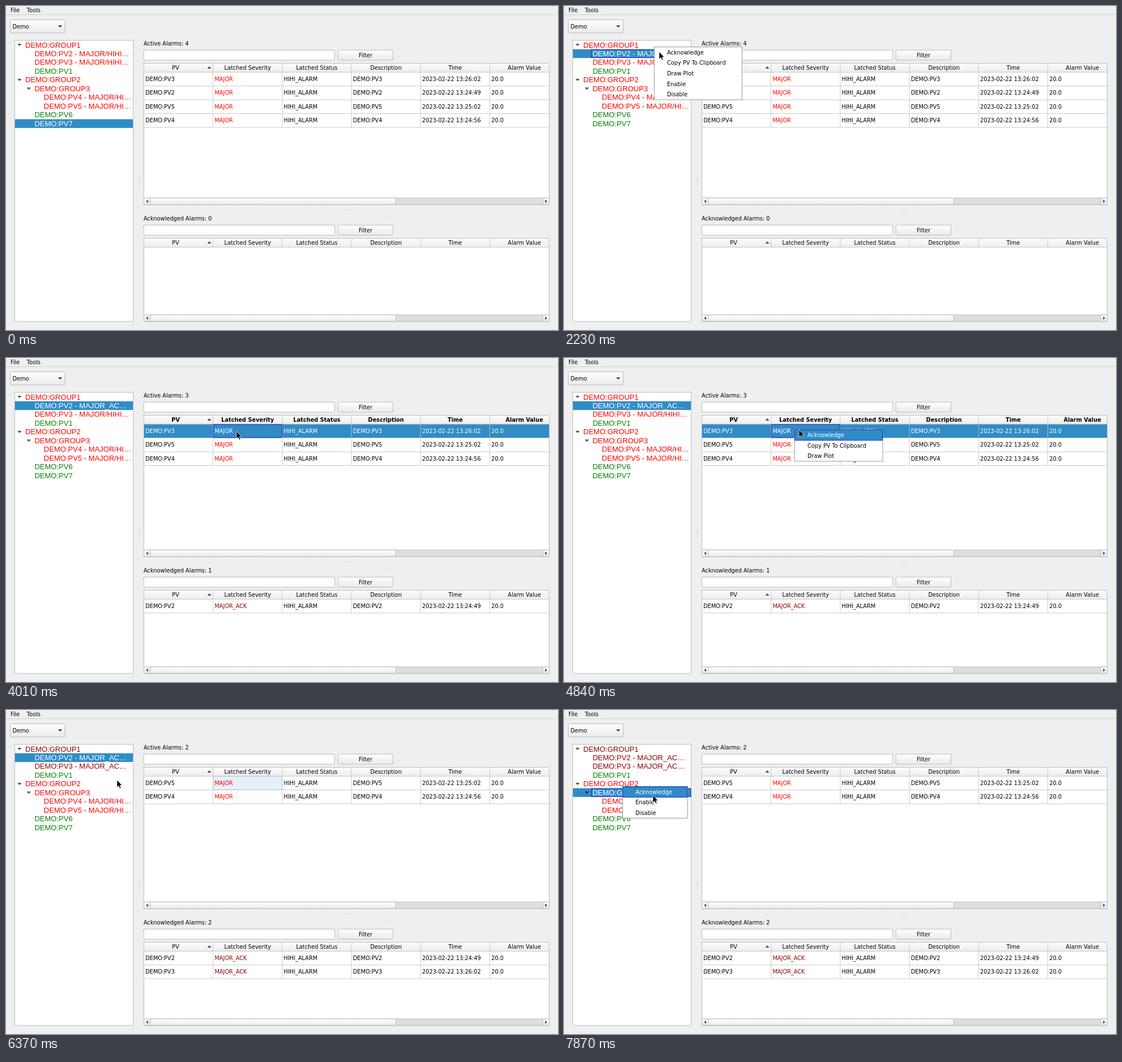
An HTML page that plays this animation: 975 by 574 pixels, repeating every 8 s.

```html
<!DOCTYPE html>
<html lang="en">
<head>
<meta charset="utf-8">
<title>Alarm list</title>
<style>
  html, body { margin: 0; width: 100%; height: 100%; overflow: hidden; background: #efefef; }
  svg { display: block; width: 975px; height: 574px; }
  text { font: 9.78px "DejaVu Sans", sans-serif; white-space: pre; }
  .tree { font: 13.04px "Liberation Sans", Arial, sans-serif; }
  .bold { font-weight: bold; }
</style>
</head>
<body>
<svg viewBox="0 0 975 574" xmlns="http://www.w3.org/2000/svg">
  <defs>
    <linearGradient id="btn" x2="0" y2="1">
      <stop stop-color="#fefefe"/><stop offset="1" stop-color="#ebebeb"/>
    </linearGradient>
    <linearGradient id="head" x2="0" y2="1">
      <stop stop-color="#fbfbfb"/><stop offset="1" stop-color="#eeeeee"/>
    </linearGradient>
  </defs>
  <g id="scene"></g>
  <path id="cursor" d="M0 0V13L3 10.4 5.1 15 7.2 14.1 5.1 9.7H9.2Z" fill="#000" stroke="#fff" stroke-width=".7"/>
</svg>
<script>
const LOOP = 8000;
const RED = '#ff0000', DARK = '#8b0000', GREEN = '#008000', BLUE = '#308cc6', FOCUS = '#1420c8';
const ROW = 24.45, COL = 122.2, LINE = 15.49, ITEM = 18.72;
const LEFT = 243.5, RIGHT = 959.5;
const scene = document.getElementById('scene');
const cursor = document.getElementById('cursor');

const rect = (x, y, w, h, fill, stroke = 'none', rx = 0) =>
  `<rect x="${x}" y="${y}" width="${w}" height="${h}" fill="${fill}" stroke="${stroke}" stroke-width=".9" rx="${rx}"/>`;
const line = (x1, y1, x2, y2, color) =>
  `<path d="M${x1} ${y1}L${x2} ${y2}" stroke="${color}" stroke-width=".9"/>`;
const text = (x, y, s, fill = '#000', cls = '', anchor = 'start') =>
  `<text x="${x}" y="${y}" fill="${fill}" class="${cls}" text-anchor="${anchor}">${s}</text>`;
const shape = (d, fill = '#404040') => `<path d="${d}" fill="${fill}"/>`;

// Active alarms come first in time order of the sort; each knows when it was acknowledged.
const times = { PV2: '13:24:49', PV3: '13:26:02', PV4: '13:24:56', PV5: '13:25:02' };
const ackAt = { PV2: 2960, PV3: 5670, PV4: Infinity, PV5: Infinity };
const headings = ['PV', 'Latched Severity', 'Latched Status', 'Description', 'Time', 'Alarm Value'];

const menus = [
  { open: 1580, paint: 1820, hover: 2270, close: 2610, x: 159.5, y: 72.5, w: 155,
    items: ['Acknowledge', 'Copy PV To Clipboard', 'Draw Plot', 'Enable', 'Disable'] },
  { open: 4560, paint: 4770, hover: 4800, close: 5410, x: 407.5, y: 126.8, w: 155.5,
    items: ['Acknowledge', 'Copy PV To Clipboard', 'Draw Plot'] },
  { open: 7430, paint: 7630, hover: 7670, close: LOOP, x: 103.7, y: 135.5, w: 114.5,
    items: ['Acknowledge', 'Enable', 'Disable'] }
];

// time, x, y, upward bow of the way there
const path = [
  [100, 825, 311], [640, 167, 71], [740, 168, 81], [2270, 168, 81], [2390, 188, 81],
  [3200, 188, 81], [3470, 396, 133], [3760, 407, 130], [4200, 407, 130], [4260, 407, 126.5],
  [4770, 407, 126.5], [4840, 415, 127], [5120, 429, 132], [5890, 429, 132],
  [6620, 110, 141, 18], [7030, 110, 141], [7170, 112, 144], [7630, 112, 144], [7870, 157, 151]
];

function cursorAt(t) {
  const i = path.findIndex(k => k[0] > t);
  if (i < 0) return path[path.length - 1].slice(1, 3);
  const a = path[i - 1], b = path[i];
  const u = (t - a[0]) / (b[0] - a[0]), e = u * u * (3 - 2 * u);
  return [a[1] + (b[1] - a[1]) * e, a[2] + (b[2] - a[2]) * e - (b[3] || 0) * 4 * e * (1 - e)];
}

function toolbar() {
  return line(0, 15.4, 975, 15.4, '#cfcfcf') + text(8, 11.4, 'File') + text(36.7, 11.4, 'Tools') +
    rect(7.5, 24.5, 96.8, 23.3, 'url(#btn)', '#b0b0b0', 2) + text(11.5, 39.8, 'Demo') +
    shape('M92 34.3h7.4l-3.7 4z');
}

function tree(t) {
  const acked = t >= 5670;
  const leaf = (name, room) => `DEMO:${name} - MAJOR` +
    (t >= ackAt[name] ? '_AC…' : room ? '/HIHI…' : '/HI…');
  const tone = name => t >= ackAt[name] ? DARK : RED;
  const rows = [
    [0, 'DEMO:GROUP1', acked ? DARK : RED, true],
    [1, leaf('PV2', true), tone('PV2')],
    [1, leaf('PV3', true), tone('PV3')],
    [1, 'DEMO:PV1', GREEN],
    [0, 'DEMO:GROUP2', RED, true],
    [1, 'DEMO:GROUP3', RED, true],
    [2, leaf('PV4'), RED],
    [2, leaf('PV5'), RED],
    [1, 'DEMO:PV6', GREEN],
    [1, 'DEMO:PV7', GREEN]
  ];
  const picked = t < 1170 ? 9 : t < 6990 ? 1 : 5;
  const focused = t >= 1170 && t < 4010 || t >= 6990;
  let out = rect(15.3, 60.9, 209.4, 498, '#fff', '#b2b2b2');
  rows.forEach(([depth, label, color, group], i) => {
    const mid = 68.9 + i * LINE, x = 34 + depth * 16.4;
    const on = i === picked;
    if (on) {
      out += rect(15.8, mid - 7.75, 208.4, LINE, BLUE);
      if (focused) out += rect(48.5, mid - 7.2, 175.5, LINE - 1.1, 'none', FOCUS);
    }
    if (group) out += shape(`M${x - 13.8} ${mid - 1.9}h7.4l-3.7 4z`, on ? '#10206a' : '#505050');
    out += text(x, mid + 4.6, label, on ? '#fff' : color, 'tree');
  });
  return out;
}

function scrollBar(y) {
  const mid = y + 5.9;
  return rect(LEFT, y, RIGHT - LEFT, 11.6, '#dedede', '#b8b8b8') +
    rect(LEFT, y, 11.5, 11.6, 'url(#btn)', '#b8b8b8') +
    rect(255, y, 433.3, 11.6, 'url(#btn)', '#b8b8b8') +
    rect(948.3, y, 11.2, 11.6, 'url(#btn)', '#b8b8b8') +
    shape(`M251 ${mid - 3}v6l-3.6 -3z`) + shape(`M952.3 ${mid - 3}v6l3.6 -3z`);
}

function panel(top, height, title, names, opts) {
  const body = top + 15.7, bottom = top + height;
  let out = text(243, top - 31.4, title) +
    rect(243.4, top - 23.3, 337.2, 17.8, '#fff', '#b4b4b4', 1.5) +
    rect(586.4, top - 23.3, 97.2, 17.8, 'url(#btn)', '#b4b4b4', 1.5) +
    text(635, top - 10.9, 'Filter', '#000', '', 'middle') +
    rect(LEFT, top, RIGHT - LEFT, height, '#fff', '#b2b2b2') +
    rect(LEFT + .4, top + .4, RIGHT - LEFT - .8, 15.2, 'url(#head)');

  if (opts.selected) out += rect(LEFT + .4, body, RIGHT - LEFT - .8, ROW, BLUE);
  if (opts.hover) out += rect(LEFT + COL + .5, body + .4, COL - 1, ROW - 1, '#e5f1f8', '#b0d4ea');

  headings.forEach((label, i) => {
    const x = LEFT + i * COL;
    out += text(x + 61.1 - (i ? 0 : 5), top + 11.9, label, '#000', opts.selected ? 'bold' : '', 'middle');
    if (i) out += line(x, top, x, body, '#c6c6c6') +
      line(x, body, x, body + names.length * ROW, '#c4c4c4');
  });
  out += line(LEFT, body, RIGHT, body, '#bcbcbc') +
    shape(`M355.6 ${top + 9.3}h7l-3.5 -3.7z`);

  names.forEach((name, r) => {
    const y = body + r * ROW, on = opts.selected && !r;
    const pv = 'DEMO:' + name;
    const cells = [pv, opts.severity, 'HIHI_ALARM', pv, '2023-02-22 ' + times[name], '20.0'];
    out += line(LEFT, y + ROW, RIGHT, y + ROW, '#c4c4c4');
    cells.forEach((s, c) => {
      const color = on ? '#fff' : c === 1 ? opts.tone : '#000';
      out += text(LEFT + c * COL + 2.7, y + 15.7, s, color);
    });
  });
  if (opts.selected) out += rect(LEFT + COL + .6, body + .6, COL - 1.2, ROW - 1.2, 'none', FOCUS);
  return out + scrollBar(bottom - 11.7);
}

function menu(m, t) {
  const h = m.items.length * ITEM;
  if (t < m.paint) return rect(m.x - .4, m.y - .4, m.w + .8, h + .8, '#fff');
  let out = rect(m.x, m.y, m.w, h, '#fff', '#8e8e8e');
  if (t >= m.hover) out += rect(m.x + .5, m.y + .4, m.w - 1, ITEM, BLUE, FOCUS);
  m.items.forEach((s, i) => {
    out += text(m.x + 22.5, m.y + (i + .5) * ITEM + 3.7, s, !i && t >= m.hover ? '#fff' : '#000');
  });
  return out;
}

function grips() {
  let out = '';
  for (let i = 0; i < 6; i++) {
    out += rect(596.5 + i * 2.4, 360, 1, 1, '#c2c2c2');
    for (let j = 0; j < 2; j++) out += rect(233.8 + j * 2.4, 304.5 + i * 2.5, 1, 1, '#cfcfcf');
  }
  return out;
}

function draw(t) {
  const active = ['PV3', 'PV2', 'PV5', 'PV4'].filter(n => t < ackAt[n]);
  const acked = ['PV2', 'PV3'].filter(n => t >= ackAt[n]);
  const open = menus.find(m => t >= m.open && t < m.close);
  return toolbar() + tree(t) + grips() +
    panel(101.5, 250.3, 'Active Alarms: ' + active.length, active, {
      severity: 'MAJOR', tone: RED,
      selected: t >= 4010 && t < 5670, hover: t >= 5670 && t < 6990
    }) +
    panel(411.5, 147.4, 'Acknowledged Alarms: ' + acked.length, acked, {
      severity: 'MAJOR_ACK', tone: DARK
    }) +
    (open ? menu(open, t) : '');
}

const cuts = [1170, 2960, 4010, 5670, 6990, ...menus.flatMap(m => [m.open, m.paint, m.hover, m.close])];
let shown = -1;

function frame(now) {
  const t = now % LOOP;
  const phase = cuts.filter(c => c <= t).length;
  if (phase !== shown) {
    scene.innerHTML = draw(t);
    shown = phase;
  }
  cursor.style.display = t < 100 ? 'none' : '';
  if (t >= 100) cursor.setAttribute('transform', `translate(${cursorAt(t).map(v => Math.round(v))})`);
}

const start = performance.now();
function tick() {
  frame(performance.now() - start);
  requestAnimationFrame(tick);
}
tick();
</script>
</body>
</html>
```
